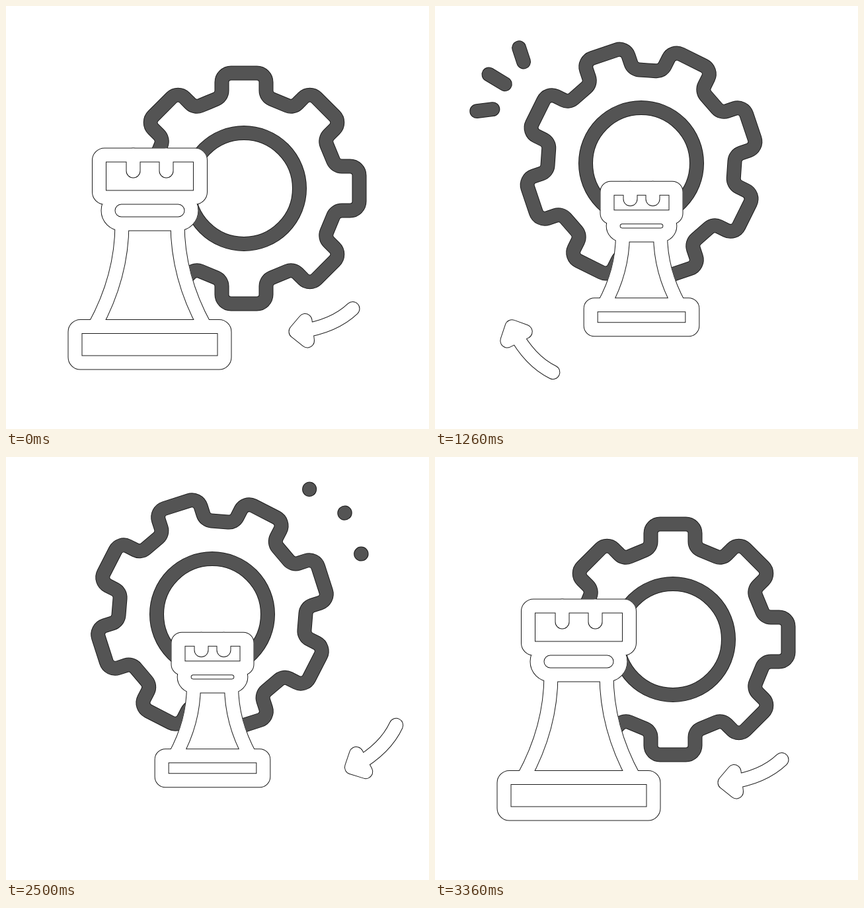
Animation, 640 px wide and 640 px high, one loop 3.48 s. Source, as an HTML page with a canvas:

```html
<!DOCTYPE html>
<html lang="en">
<head>
<meta charset="utf-8">
<title>Rook and gear</title>
<style>
  html, body { margin: 0; width: 100%; height: 100%; overflow: hidden; background: #fff; }
  canvas { display: block; width: 640px; height: 640px; }
</style>
</head>
<body>
<canvas id="stage" width="640" height="640"></canvas>
<script>
const LOOP = 3480, WIDTH = 21, EDGE = '#1c1c1c', GRAY = '#545454';
const ctx = document.getElementById('stage').getContext('2d');
const gearLayer = document.createElement('canvas');
gearLayer.width = gearLayer.height = 640;
const gearCtx = gearLayer.getContext('2d');

const lerp = (a, b, p) => a + (b - a) * p;

// Eased value between [time, value] keys
function track(t, ...keys) {
  if (t <= keys[0][0]) return keys[0][1];
  for (let i = 1; i < keys.length; i++) {
    const [t0, a] = keys[i - 1], [t1, b] = keys[i];
    if (t < t1) return lerp(a, b, (1 - Math.cos(Math.PI * (t - t0) / (t1 - t0))) / 2);
  }
  return keys[keys.length - 1][1];
}

function stroke(c, path, color, width) {
  c.lineCap = c.lineJoin = 'round';
  c.strokeStyle = color;
  c.lineWidth = width;
  c.stroke(path);
}

function edgedStroke(c, path) {
  stroke(c, path, EDGE, WIDTH + 1);
  stroke(c, path, GRAY, WIDTH - 1);
}

function place(path, x, y, degrees = 0, scale = 1) {
  const out = new Path2D();
  out.addPath(path, new DOMMatrix().translate(x, y).rotate(degrees).scale(scale));
  return out;
}

function makeGear() {
  const points = [];
  for (let i = 0; i < 8; i++) {
    const a = i * Math.PI / 4, c = Math.cos(a), s = Math.sin(a);
    for (const [x, y] of [[-33.5, -138.7], [-33.5, -174.5], [33.5, -174.5], [33.5, -138.7]])
      points.push([x * c - y * s, x * s + y * c]);
  }
  const path = new Path2D(), n = points.length;
  path.moveTo((points[0][0] + points[n - 1][0]) / 2, (points[0][1] + points[n - 1][1]) / 2);
  points.forEach((p, i) => path.arcTo(...p, ...points[(i + 1) % n], 14));
  path.closePath();
  return path;
}

// Coordinates are relative to the rook's centre
function makeRook() {
  const body = new Path2D(), notches = new Path2D();
  body.roundRect(-76.5, -157, 153, 64, 8);
  body.roundRect(-63, -93, 126, 40, 20);
  body.roundRect(-113, 102.5, 226, 54.5, 8);
  body.moveTo(-42, -53);
  body.quadraticCurveTo(-42, 27, -83.5, 102.5);
  body.lineTo(83.5, 102.5);
  body.quadraticCurveTo(42, 27, 42, -53);
  body.closePath();
  for (const x of [-25, 25]) {
    notches.moveTo(x, -157);
    notches.lineTo(x, -133);
  }
  return { body, notches };
}

// Coordinates are relative to the arrow's pivot
function makeArrow() {
  const path = new Path2D();
  path.moveTo(212.5, 220);
  path.quadraticCurveTo(184, 247, 134, 254);
  path.moveTo(140.5, 238);
  path.lineTo(126.5, 254.5);
  path.lineTo(144, 268.5);
  path.closePath();
  return path;
}

const gear = makeGear(), rook = makeRook(), arrow = makeArrow();
const ring = new Path2D();
ring.arc(0, 0, 84, 0, 2 * Math.PI);

// Each ray: angle in degrees, inner radius, outer radius
const rays = [[-108.2, 54, 97], [-148.8, 41, 96], [173.1, 54, 101]];

function drawRays(t, start, x, y, turn) {
  if (t < start || t >= start + 390) return;
  const head = track(t, [start, 0], [start + 280, 1]);
  const tail = track(t, [start + 90, 0], [start + 390, 1]);
  for (const [angle, inner, outer] of rays) {
    const a = (angle + turn) * Math.PI / 180, path = new Path2D();
    for (const p of [tail, head]) {
      const r = lerp(inner, outer, p);
      path.lineTo(x + r * Math.cos(a), y + r * Math.sin(a));
    }
    edgedStroke(ctx, path);
  }
}

function draw(t) {
  const move = track(t, [320, 0], [807, 1], [2780, 1], [3260, 0]);
  const scale = track(t, [690, 1], [1100, 0.68], [2780, 0.68], [3260, 1]);
  const spin = track(t, [500, 0], [1400, 28], [2450, -18], [3360, 0]);
  const swing = track(t, [320, 0], [1360, 71.5], [2310, -24], [3220, 0]);
  const drop = track(t, [320, 0], [1010, 41], [2780, 41], [3260, 0]);

  const rookX = lerp(217.5, 312.5, move);
  const body = place(rook.body, rookX, 382.5, 0, scale);
  const notches = place(rook.notches, rookX, 382.5, 0, scale);
  const pointer = place(arrow, 312, 238 + drop, swing);

  ctx.fillStyle = '#fff';
  ctx.fillRect(0, 0, 640, 640);
  const outlines = [body, notches, pointer];
  for (const path of outlines) stroke(ctx, path, EDGE, WIDTH + 1);
  for (const path of outlines) stroke(ctx, path, '#fff', WIDTH - 1);

  // The rook's silhouette is cut out of the gear
  const gx = lerp(360, 312, move), gy = lerp(276, 238, move);
  gearCtx.clearRect(0, 0, 640, 640);
  edgedStroke(gearCtx, place(gear, gx, gy, spin));
  edgedStroke(gearCtx, place(ring, gx, gy));
  gearCtx.globalCompositeOperation = 'destination-out';
  gearCtx.fill(body);
  stroke(gearCtx, body, '#000', WIDTH);
  gearCtx.globalCompositeOperation = 'source-over';
  ctx.drawImage(gearLayer, 0, 0);

  drawRays(t, 1060, 155, 148, 0);
  drawRays(t, 2130, 440.6, 147.8, 107.5);
}

const began = performance.now();
function frame() {
  draw((performance.now() - began) % LOOP);
  requestAnimationFrame(frame);
}
frame();
</script>
</body>
</html>
```
